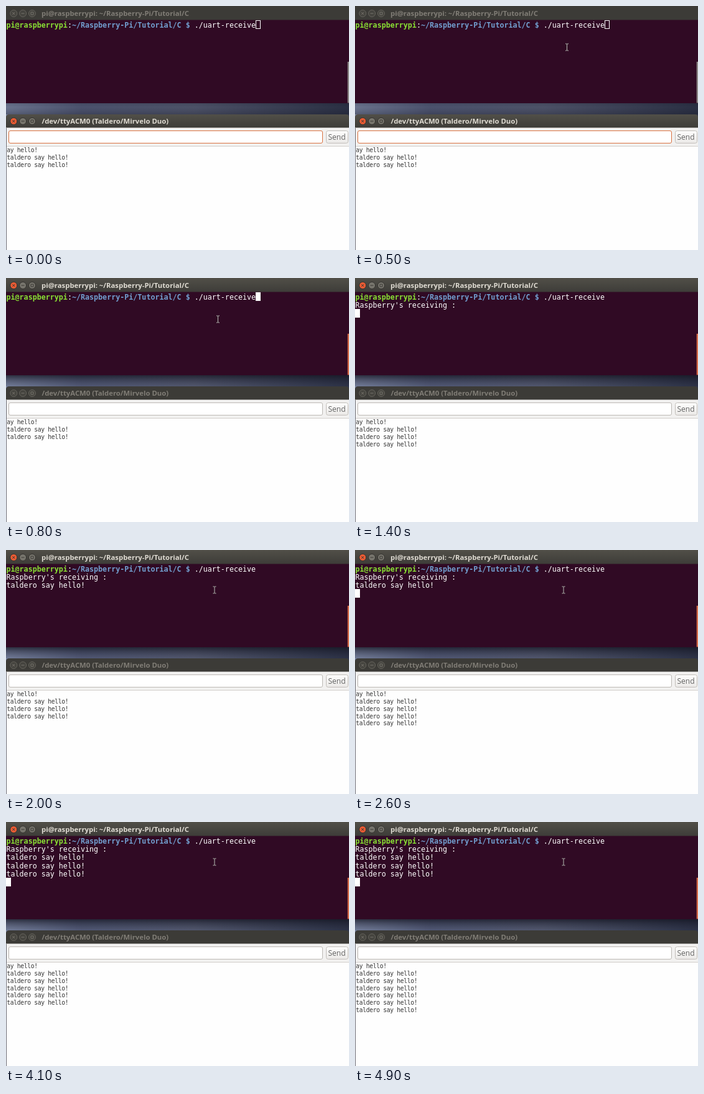
An HTML page for the animation above (5000 ms loop, 551 by 394 pixels).

```html
<!DOCTYPE html>
<html lang="en">
<head>
<meta charset="utf-8">
<title>Serial receive</title>
<style>
  html, body { margin: 0; width: 100%; height: 100%; overflow: hidden; background: #434960; }
  svg { display: block; width: 551px; height: 394px; }
  text { white-space: pre; }
  .title { font: bold 11.35px "Open Sans", sans-serif; fill: #807d76; }
  .shell { font: 11.68px "DejaVu Sans Mono", monospace; fill: #fff; }
  .shell .host { font-weight: bold; fill: #8ae234; }
  .shell .path { font-weight: bold; fill: #729fcf; }
  .log { font: 9.7px "DejaVu Sans Mono", monospace; letter-spacing: -.34px; fill: #333; }
  .send { font: 12px "Open Sans", sans-serif; fill: #636363; }

  .bar { fill: #3c3b37; }
  .knob { fill: #45443f; stroke: #65635c; }
  .sign { fill: none; stroke: #77746c; }
  .thumb { fill: #8c8786; }
  .field { fill: #fff; stroke: #bcb8b4; }
  .shade { opacity: .4; }

  .active .title { fill: #dfdbd2; }
  .active .bar { fill: url(#barFill); }
  .active .knob { fill: #77756d; stroke: #33322e; }
  .active .close { fill: #ec5c34; }
  .active .sign { stroke: #393732; }
  .active .thumb { fill: #d56a48; }
  .active .field { stroke: #d9703f; }
  .active .shade { opacity: 1; }

  .caret { fill: none; stroke: #fff; }
  .active .caret { fill: #fff; }
  .beam { fill: none; stroke: #b9c0b6; }
</style>
</head>
<body>
<svg viewBox="0 0 551 394">
  <defs>
    <linearGradient id="barFill" x2="0" y2="1">
      <stop stop-color="#514f48"/><stop offset="1" stop-color="#3d3c38"/>
    </linearGradient>
    <linearGradient id="desk">
      <stop stop-color="#7f8aa8"/><stop offset=".22" stop-color="#596180"/>
      <stop offset=".55" stop-color="#5a6078"/><stop offset="1" stop-color="#30364c"/>
    </linearGradient>
    <linearGradient id="fall" x2="0" y2="1">
      <stop stop-color="#12131f" stop-opacity=".75"/><stop offset="1" stop-color="#12131f" stop-opacity="0"/>
    </linearGradient>
    <linearGradient id="rise" x2="0" y2="1">
      <stop stop-color="#12131f" stop-opacity="0"/><stop offset="1" stop-color="#12131f" stop-opacity=".4"/>
    </linearGradient>
    <linearGradient id="buttonFill" x2="0" y2="1">
      <stop stop-color="#fdfdfc"/><stop offset="1" stop-color="#ebe9e7"/>
    </linearGradient>
    <g id="knobs">
      <circle class="knob close" cx="12.3" r="5.5"/>
      <circle class="knob" cx="27.1" r="5.5"/>
      <circle class="knob" cx="42" r="5.5"/>
      <path class="sign" d="M10.3-2l4 4m0-4l-4 4M24.6 0h5M40-2h4v4h-4z"/>
    </g>
  </defs>

  <rect width="551" height="394" fill="url(#desk)"/>

  <g id="terminal">
    <rect class="shade" y="157" width="551" height="17" fill="url(#fall)"/>
    <rect class="bar" width="551" height="23"/>
    <g class="buttons" transform="translate(0 12)"></g>
    <text class="title" x="57" y="16.2">pi@raspberrypi: ~/Raspberry-Pi/Tutorial/C</text>
    <rect y="22.5" width="551" height="134.5" fill="#300a24"/>
    <rect class="thumb" x="548.7" y="90" width="2.3" height="66.5"/>
    <text class="shell" x="0.5" y="34.6"><tspan class="host">pi@raspberrypi</tspan>:<tspan class="path">~/Raspberry-Pi/Tutorial/C $</tspan> ./uart-receive</text>
    <g id="output"></g>
    <rect class="caret" id="caret" width="7" height="13"/>
    <path class="beam" id="beam" d="M-2.5-5.5h2l.5.5.5-.5h2M0-5V5M-2.5 5.5h2l.5-.5.5.5h2"/>
  </g>

  <g id="monitor">
    <rect class="shade" y="163" width="551" height="12" fill="url(#rise)"/>
    <path class="bar" d="M0 197v-17q0-5 5-5h541q5 0 5 5v17z"/>
    <g class="buttons" transform="translate(0 186)"></g>
    <text class="title" x="57.5" y="190.2">/dev/ttyACM0 (Taldero/Mirvelo Duo)</text>
    <rect y="196.5" width="551" height="30" fill="#f2f1f0"/>
    <rect class="field" x="4.5" y="201.5" width="504" height="20" rx="2.5"/>
    <rect x="514.5" y="201.5" width="35" height="20" rx="3" fill="url(#buttonFill)" stroke="#c2beba"/>
    <text class="send" x="517.5" y="215.9">Send</text>
    <rect x="1" y="226" width="550" height="168" fill="#fefefe"/>
    <path d="M0 226.5h551" stroke="#d3d0cd"/>
    <path d="M.5 197v197" stroke="#6c6d76"/>
    <g id="log"></g>
  </g>
</svg>

<script>
  const LOOP = 5000;
  const FOCUS = 700, ENTER = 1200;
  const ROW = 13.3;
  const GREETING = 'taldero say hello!';
  const $ = id => document.getElementById(id);

  const outputLines = [[ENTER, "Raspberry's receiving :"],
    ...[2000, 3100, 4100].map(at => [at, GREETING])];
  const logLines = [[0, 'ay hello!'],
    ...[0, 0, 1400, 2500, 3500, 4600].map(at => [at, GREETING])];

  for (const slot of document.querySelectorAll('.buttons')) {
    slot.append($('knobs').cloneNode(true));
    slot.firstChild.removeAttribute('id');
  }

  function addLines(parent, lines, style, x, y, pitch) {
    return lines.map(([at, words], i) => {
      const node = document.createElementNS(parent.namespaceURI, 'text');
      node.setAttribute('class', style);
      node.setAttribute('x', x);
      node.setAttribute('y', y + i * pitch);
      node.textContent = words;
      parent.append(node);
      return { at, node };
    });
  }

  const timed = [
    ...addLines($('output'), outputLines, 'shell', 0.5, 34.6 + ROW, ROW),
    ...addLines($('log'), logLines, 'log', 1.3, 236.4, 11.73)
  ];

  const show = (node, on) => node.style.display = on ? '' : 'none';
  const place = (node, x, y) => node.setAttribute('transform', `translate(${x} ${y})`);

  function draw(t) {
    const focused = t >= FOCUS;
    $('terminal').classList.toggle('active', focused);
    $('monitor').classList.toggle('active', !focused);
    for (const { at, node } of timed) show(node, t >= at);

    // The caret blinks 600 ms on, 600 ms off once the program runs.
    const row = t < ENTER ? 0 : 1 + outputLines.filter(([at]) => t >= at).length;
    place($('caret'), row ? 0.5 : 401.5, Math.round(23.3 + row * ROW) + 0.5);
    show($('caret'), t < 1900 || (t - 1300) % 1200 < 600);

    // The pointer hides while a key is pressed.
    show($('beam'), t >= 400 && t < ENTER || t >= 1700);
    if (t < ENTER) place($('beam'), 340.5, 66.5);
    else if (t < 1900) place($('beam'), 338.5, 65.5);
    else place($('beam'), 335, 64.5);
  }

  function tick() {
    draw(performance.now() % LOOP);
    requestAnimationFrame(tick);
  }
  tick();
</script>
</body>
</html>
```
